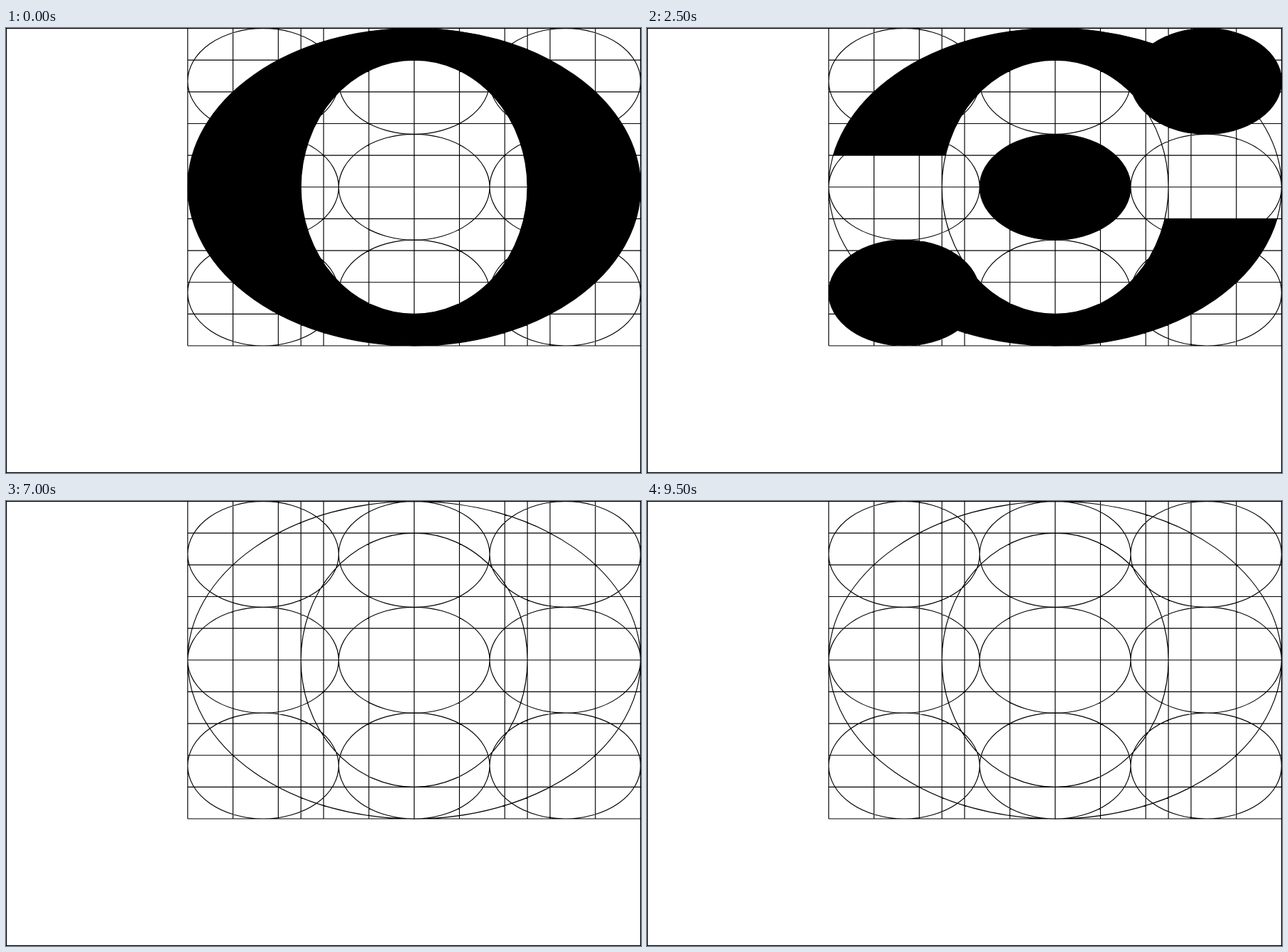
An HTML page that plays this animation: 894 by 626 pixels, repeating every 10000 ms.

```html
<!DOCTYPE html>
<html lang="en">
<head>
<meta charset="utf-8">
<title>Letter construction</title>
<style>
  html, body { margin: 0; width: 100%; height: 100%; overflow: hidden; background: #fff; }
  svg { display: block; width: 894px; height: 626px; }
</style>
</head>
<body>
<svg viewBox="0 0 894 626">
  <defs>
    <clipPath id="arm"><path d="M250 0H712V95H575V179.1H250Z"/></clipPath>
    <path id="ring" fill-rule="evenodd"/>
  </defs>
  <g id="lines" fill="none" stroke="#000" stroke-width="1.15">
    <rect x=".5" y=".5" width="893" height="625" stroke-width="1.3"/>
  </g>
  <g id="letterO"><use href="#ring"/></g>
  <g id="letterS"></g>
</svg>
<script>
const left = 255.8, top0 = 0.5, colWidth = 63.77, rowHeight = 44.65;
const gridX = column => left + column * colWidth;
const gridY = row => top0 + row * rowHeight;
const centerX = gridX(5), centerY = gridY(5);
const byId = id => document.getElementById(id);

const ellipse = (cx, cy, rx, ry) =>
  `M${cx - rx} ${cy}a${rx} ${ry} 0 1 0 ${2 * rx} 0a${rx} ${ry} 0 1 0 ${-2 * rx} 0Z`;

// Balls sit on a 3 × 3 arrangement around the center.
const ball = (column, row) => ellipse(
  centerX + column * colWidth * 10 / 3, centerY + row * rowHeight * 10 / 3,
  colWidth * 5 / 3, rowHeight * 5 / 3);

const ring = ellipse(centerX, centerY, colWidth * 5, rowHeight * 5) +
             ellipse(centerX, centerY, colWidth * 2.5, rowHeight * 4);

let construction = ring;
for (const column of [0, 1, 2, 2.5, 3, 4, 5, 6, 7, 7.5, 8, 9, 10])
  construction += `M${gridX(column)} ${gridY(0)}V${gridY(10)}`;
for (let row = 0; row <= 10; row++)
  construction += `M${gridX(0)} ${gridY(row)}H${gridX(10)}`;
for (const column of [-1, 0, 1])
  for (const row of [-1, 0, 1]) construction += ball(column, row);

byId("lines").innerHTML += `<path d="${construction}"/>`;
byId("ring").setAttribute("d", ring);

const arm = '<use href="#ring" clip-path="url(#arm)"/>';
byId("letterS").innerHTML = `${arm}
  <g transform="rotate(180 ${centerX} ${centerY})">${arm}</g>
  <path d="${ball(1, -1) + ball(0, 0) + ball(-1, 1)}"/>`;

// Each letter holds for 2 s, followed by half a second of bare construction.
const sequence = ["O", "S", "O", "S"];
const slot = 2500, hold = 2000;
const start = performance.now();

function draw() {
  const time = (performance.now() - start) % (slot * sequence.length);
  const letter = time % slot < hold ? sequence[Math.floor(time / slot)] : "";
  for (const name of ["O", "S"])
    byId("letter" + name).style.display = name === letter ? "" : "none";
  requestAnimationFrame(draw);
}
draw();
</script>
</body>
</html>
```
